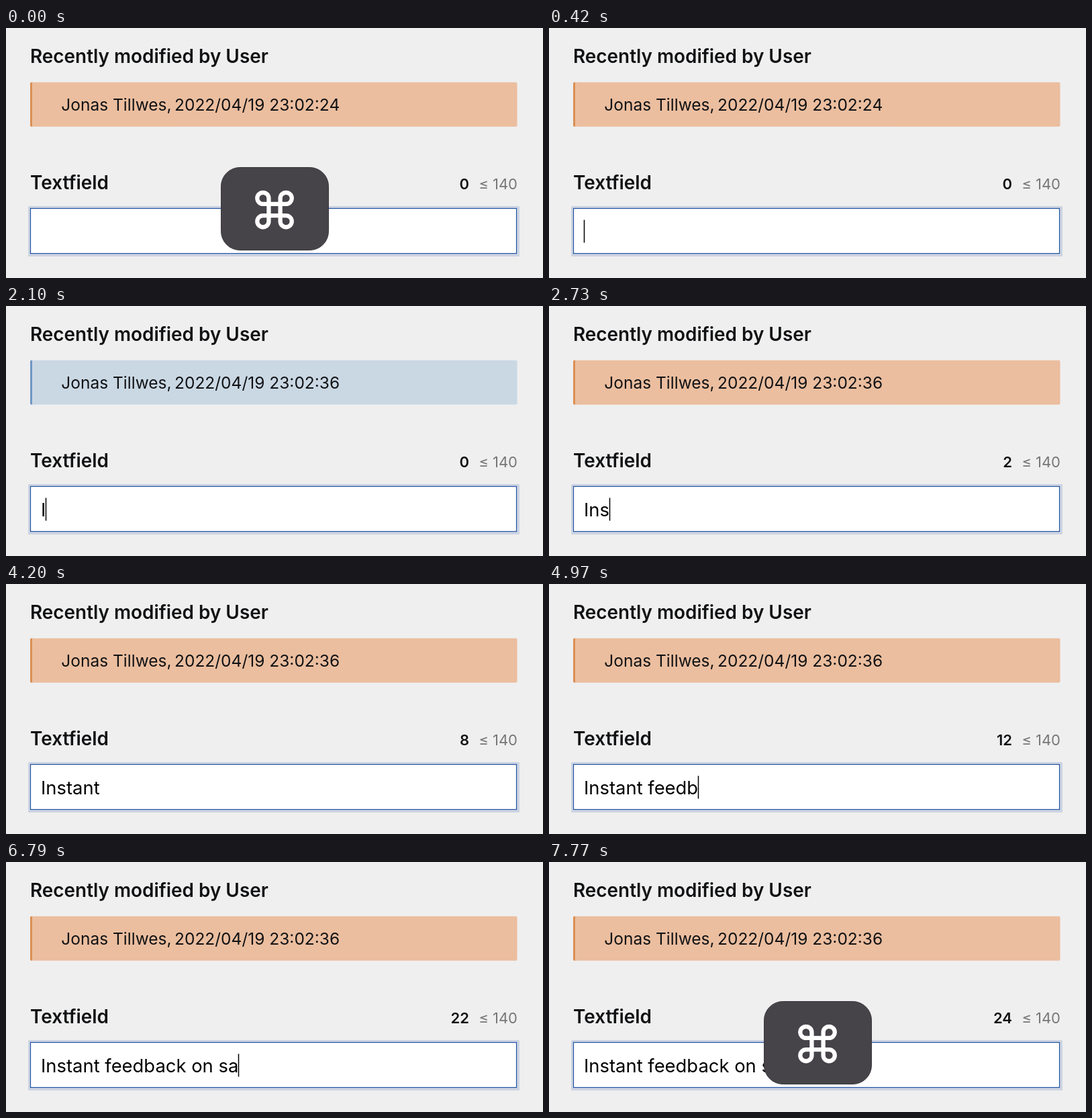
Animation, 800 px wide and 372 px high, one loop 8000 ms. Source, as an HTML page:

```html
<!DOCTYPE html>
<html lang="en">
<head>
<meta charset="utf-8">
<title>Textfield</title>
<style>
  html, body { margin: 0; width: 100%; height: 100%; overflow: hidden; background: #efefef; }
  svg { display: block; width: 100vw; height: 100vh; }
  text {
    font-family: Inter, Roboto, "Liberation Sans", sans-serif;
    font-optical-sizing: none;
    white-space: pre;
    fill: #111214;
  }
  .label { font-size: 27.9px; font-weight: 600; }
  .note { font-size: 24.5px; }
  .count { font-size: 22px; text-anchor: end; }
  .input { font-size: 27.4px; fill: #000; }
</style>
</head>
<body>
<svg viewBox="0 0 800 372">
  <text class="label" x="36" y="52">Recently modified by User</text>

  <rect id="note" x="36" y="80.7" width="725.5" height="66" rx="2"/>
  <path id="bar" d="M39 80.7H38a2 2 0 0 0-2 2v62a2 2 0 0 0 2 2h1z"/>
  <text class="note" x="82.3" y="122.5">Jonas Tillwes,</text>
  <text class="note" id="stamp" x="251" y="122.5"></text>

  <text class="label" x="36" y="240">Textfield</text>
  <text class="count" id="count" x="690" y="240" font-weight="600"></text>
  <text class="count" x="762" y="240" style="fill:#777">≤ 140</text>

  <rect x="33" y="265" width="732" height="75" rx="1.5" fill="#cdd4e2"/>
  <rect x="36.5" y="268.5" width="724" height="67" fill="#fff" stroke="#1f51a2" stroke-width="1.2"/>
  <text class="input" id="input" x="52" y="312.5"></text>
  <rect id="caret" y="285.5" width="1.5" height="34" fill="#000"/>

  <g id="key">
    <rect x="320.5" y="207.5" width="160" height="123" rx="28" fill="#464349" stroke="#3b383e"/>
    <path transform="translate(365.7 236.2) scale(2.86)" fill="none" stroke="#fff" stroke-width="2.2"
      d="M15 6v12a3 3 0 1 0 3-3H6a3 3 0 1 0 3 3V6a3 3 0 1 0-3 3h12a3 3 0 1 0-3-3z"/>
  </g>
</svg>
<script>
  const LOOP = 8000, LAG = 140;
  const phrase = "Instant feedback on save";
  const strokes = [
    2100, 2380, 2660, 2870, 3010, 3150, 3290, 3500,
    4340, 4480, 4620, 4760, 4970, 5110, 5250, 5390,
    5740, 5880, 6020, 6230, 6440, 6650, 6860, 7070
  ];
  // [start, end] spans in ms
  const keySpans = [[0, 280], [7560, LOOP]];
  const caretSpans = [[210, 700], [1190, 1680], [2100, 4200], [4340, 7560]];
  const saved = [980, strokes[0] + LAG];
  const tints = {
    dirty: ["#ebbe9f", "#da8f55"],
    clean: ["#cad8e4", "#6f97c3"]
  };

  const el = id => document.getElementById(id);
  const [note, bar, stamp, count, input, caret, key] =
    ["note", "bar", "stamp", "count", "input", "caret", "key"].map(el);

  const within = (t, [from, to]) => t >= from && t < to;
  const typed = t => strokes.filter(s => s <= t).length;
  const show = (node, on) => node.setAttribute("visibility", on ? "visible" : "hidden");
  const write = (node, text) => {
    if (node.textContent !== text) node.textContent = text;
  };

  function draw(t) {
    const [fill, edge] = within(t, saved) ? tints.clean : tints.dirty;
    note.setAttribute("fill", fill);
    bar.setAttribute("fill", edge);
    write(stamp, "2022/04/19 23:02:" + (t < saved[0] ? "24" : "36"));

    write(input, phrase.slice(0, typed(t)));
    write(count, String(typed(t - LAG)));

    const width = input.textContent ? input.getComputedTextLength() : 0;
    caret.setAttribute("x", Math.round(52 + width) - 0.25);
    show(caret, caretSpans.some(s => within(t, s)));
    show(key, keySpans.some(s => within(t, s)));
  }

  const start = performance.now();
  function tick() {
    draw((performance.now() - start) % LOOP);
    requestAnimationFrame(tick);
  }
  draw(0);
  requestAnimationFrame(tick);
</script>
</body>
</html>
```
